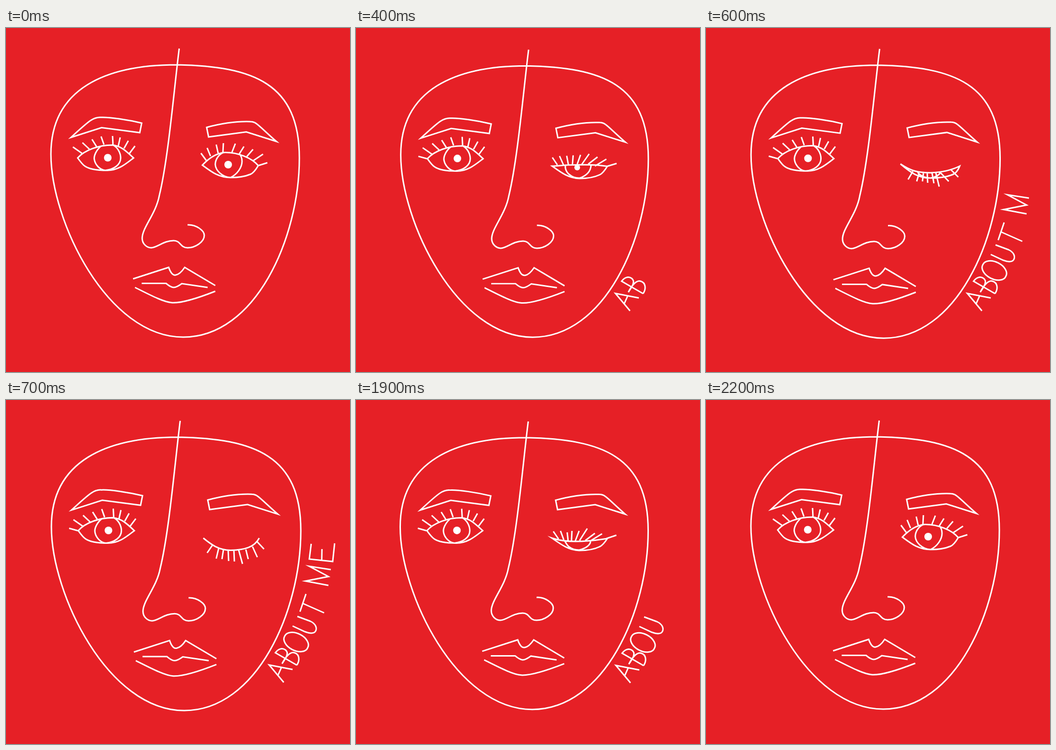
An HTML page with a canvas for the animation above (3 s loop, 720x720 px).

```html
<!DOCTYPE html>
<html lang="en">
<head>
<meta charset="utf-8">
<title>Winking face</title>
<style>
html, body { margin: 0; width: 100%; height: 100%; overflow: hidden; background: #e62026; }
canvas { display: block; width: 720px; height: 720px; }
</style>
</head>
<body>
<canvas id="stage" width="720" height="720" role="img" aria-label="A line-drawn face winks: ABOUT ME"></canvas>
<script>
const ctx = document.getElementById('stage').getContext('2d');

const face = [
  // head
  'M358 77C518 80 614 116 614 272C614 440 522 647 371 647C212 647 94 404 94 264C94 126 210 77 358 77Z',
  // nose
  'M362.5 43C352 125 340 272 321 350C314 389 285 418 285 440C285 452 295 460 304 460C318 459 330 445 351 445C366 445 364 460 380 460C396 460 415 448 415 434C415 424 398 411 380 412',
  // brows
  'M136 229L200 208.5L280 219L284 199C255 192 215 186 198 187C184 186 176 192 136 229Z',
  'M566 237.5L503 217.5L424 228L420 208C450 200 485 195 512 196C524 196 528 204 566 237.5Z',
  // mouth
  'M266 525L340.5 501C345 514 350 518 355 517C362 516 368 510 374 501L438 539',
  'M284 534.5L335 534.5Q345 543 351 543Q357 543 368 535L422 543',
  'M270 543C300 558 330 574 348 575C370 576 405 564 438 551',
  // left eye
  'M150 272C165 255 195 245 222 245C240 246 252 258 267 272C250 285 235 298 212 298C195 298 176 297 165 289Q160 286 150 272Z',
  'M198 248C189 256 183 268 185 276C187 286 196 297 208 298C226 296 240 286 240 272C240 262 234 250 224 245',
  'M140 249L160 263M160 240L176 255M180 233L190 249M199 227L205 244M223 226L224 245M239 229L235 247M256 236L247 252M270 247L258 263'
].join('');
const outerLash = 'M131 267L149 272';

const wideEye = 'M411 287C425 272 440 262 458 260.5C485 260 515 272 528 288Q519 303 512 306C500 311 485 313 470 313C445 313 430 301 411 287Z' +
  'M454 261C444 266 438 276 438 286C439 298 452 312 470 313C484 306 494 292 494 279C494 272 491 266 488 263' +
  'M408 262L419 277M421 251L428 268M440 244L444 262M455 241L454 260M480 242L473 260M498 248L488 264M517 254L504 269M538 264L517 278M547 282L528 288';

const narrowEye = 'M411 289C425 283 435 277 455 277C485 275 515 280 526 289Q517 304 511 307C500 312 485 315 469 315C445 315 430 303 411 289Z' +
  'M440 279C434 285 437 298 447 306C455 313 463 315 470 314C482 308 492 298 493 278' +
  'M409 267L419 282M424 262L433 279M440 258L445 277M457 259L455 276M473 257L467 275M492 258L477 277M511 261L492 276M533 269L508 284M546 284L527 289';

const slitEye = 'M410 289C425 294 440 296 460 296C490 296 505 293 526 290Q517 304 510 307C498 313 482 315 467 315C445 314 430 303 410 289Z' +
  'M437 295C440 300 442 305 447 308C453 313 460 314 467 314C480 311 491 304 491 295' +
  'M413 275L424 291M428 274L435 293M442 277L444 295M452 274L451 295M467 274L459 295M484 269L468 294M500 279L480 294M515 280L492 294M545 283L524 290';

const nearlyShutEye = 'M407 284.5C430 300 445 303 470 303C495 302 515 297 531 289Q525 305 513 308C500 313 480 314 470 314C445 314 430 304 407 284.5Z' +
  'M443 302C450 311 460 314 470 314C482 312 488 308 491 302' +
  'M433 300L423 317M446 304L441 321M455 304L453 321M463 303L464 324M473 303L477 325M481 303L488 332M490 302L508 321M513 297L528 312';

const shutEye = 'M413 289C430 303 445 314 470 314.5C500 314 520 308 530 289' +
  'M432 304L421 320M445 311L440 332M455 314L452 333M465 315L466 337M477 315L478 338M487 314L495 343M502 313L507 333M516 307L526 329M526 297L540 312';

// Average of two paths that share the same commands.
function halfway(a, b) {
  const others = b.match(/[\d.]+/g);
  let i = 0;
  return a.replace(/[\d.]+/g, n => (+n + +others[i++]) / 2);
}

const letters = [
  'M577.5 592L547 555.5L596 565M573 560L565 578',
  'M605 556L560 530C566 522 574 519 581 524C589 530 583 540 574 553C580 541 590 527 600 530C610 533 612 545 605 556',
  'M579.5 495.2A27 17 27 1 1 627.5 519.8A27 17 27 1 1 579.5 495.2Z',
  'M606 454L633 464C644 469 648 478 644 485C640 491 630 489 622 486L596 474',
  'M624 407L611.5 444M618 427L662 446.5',
  'M671 389L623 380L671 370.5L631 349L676 356',
  'M635 302L631 334L680 339L684 301M657 337L657.5 313'
];

const pose = (eye, pupil, count, textShift, scale, x, y) => ({
  eye: new Path2D(eye), pupil, count, textShift, scale, x, y
});
const poses = [
  pose(wideEye, [465, 286, 8], 0, [0, 0], 1, 0, 0),
  pose(narrowEye, [464, 288, 8], 1, [-4.5, 0], 0.9953, 1.3, 3.1),
  pose(halfway(narrowEye, slitEye), [463, 292, 6], 2, [-4, 0], 0.9965, 0, 2.5),
  pose(slitEye, null, 4, [-3, 0], 0.998, -1.3, 2),
  pose(nearlyShutEye, null, 6, [0, 0], 1.0025, 0, 0.6),
  pose(shutEye, null, 7, [3.8, -1], 1.004, 0.6, 0.4)
];
const facePath = new Path2D(face);
const lashPath = new Path2D(outerLash);
const letterPaths = letters.map(d => new Path2D(d));

function dot(x, y, r) {
  ctx.beginPath();
  ctx.arc(x, y, r, 0, Math.PI * 2);
  ctx.fill();
}

function poseAt(ms) {
  const step = start => Math.min(5, Math.max(0, Math.floor((ms - start) / 100) + 1));
  return step(300) - step(1800);
}

function draw() {
  const index = poseAt(performance.now() % 3000);
  const p = poses[index];
  ctx.setTransform(1, 0, 0, 1, 0, 0);
  ctx.fillStyle = '#e62026';
  ctx.fillRect(0, 0, 720, 720);
  ctx.strokeStyle = ctx.fillStyle = '#fff';
  ctx.lineWidth = 3;

  ctx.setTransform(p.scale, 0, 0, p.scale, p.x, p.y);
  ctx.stroke(facePath);
  if (index) ctx.stroke(lashPath);
  dot(213, 271.5, 8);

  ctx.setTransform(1, 0, 0, 1, 0, 0);
  ctx.stroke(p.eye);
  if (p.pupil) dot(...p.pupil);

  ctx.translate(...p.textShift);
  letterPaths.slice(0, p.count).forEach(path => ctx.stroke(path));
  requestAnimationFrame(draw);
}
draw();
</script>
</body>
</html>
```
